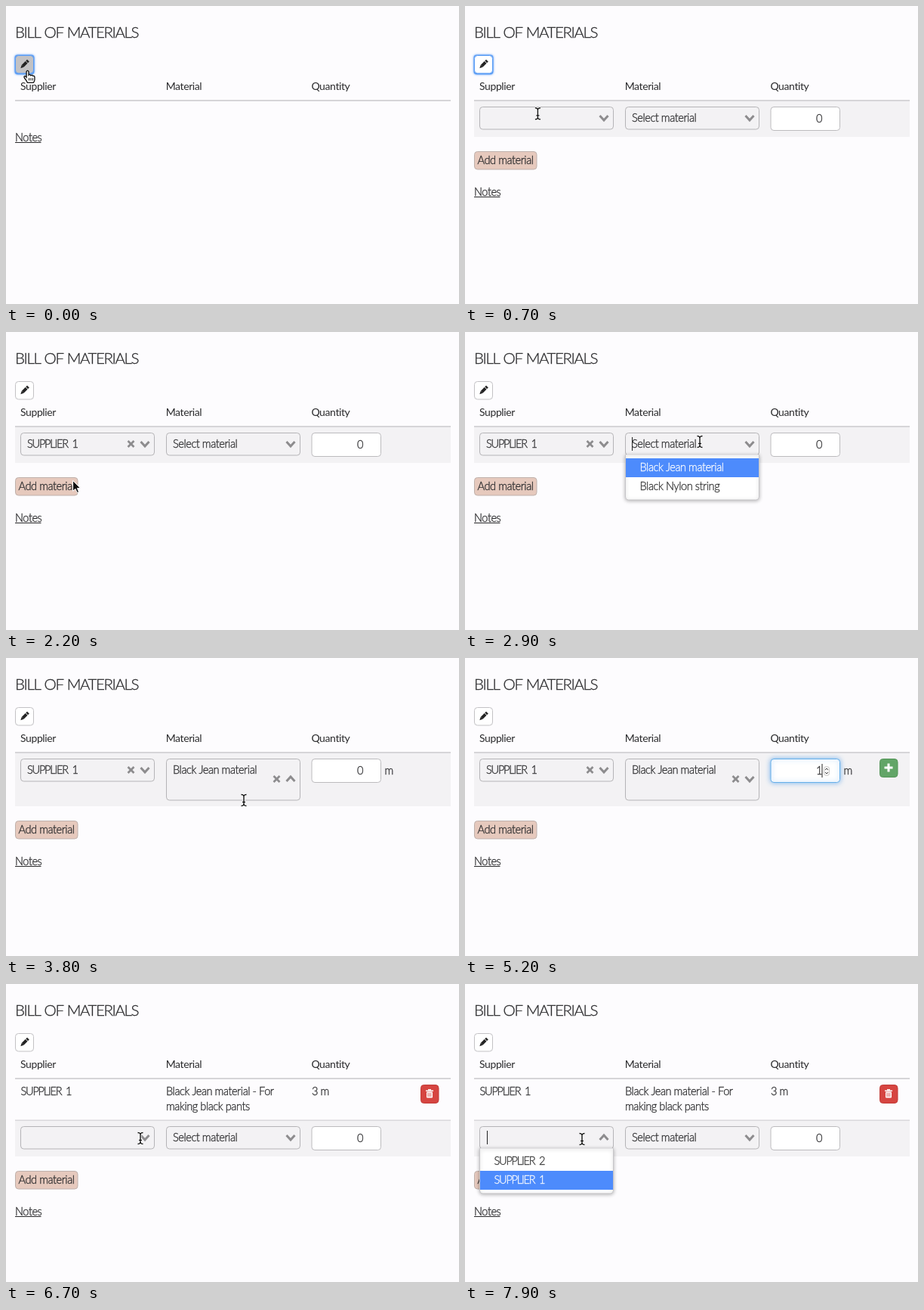
An HTML page with a canvas for the animation above (8000 ms loop, 600 px wide and 394 px high).

```html
<!DOCTYPE html>
<html lang="en">
<head>
<meta charset="utf-8">
<title>Bill of materials</title>
<style>
html, body { margin: 0; width: 100%; height: 100%; overflow: hidden; background: #fdfcfe; }
canvas { display: block; width: 600px; height: 394px; }
</style>
</head>
<body>
<canvas id="stage"></canvas>
<script>
const W = 600, H = 394, LOOP = 8000, STEP = 100;
const canvas = document.getElementById('stage');
const ctx = canvas.getContext('2d');
const dpr = window.devicePixelRatio || 1;
canvas.width = W * dpr;
canvas.height = H * dpr;

const PAGE = '#fdfcfe', ROW = '#f3f2f4', INK = '#2b2b2d', BLUE = '#4d8bfc';
const FONT = 'Lato, "Open Sans", sans-serif';
// font, letter spacing, word spacing, extra stroke
const STYLES = {
  title: ['300 20.5px ' + FONT, '-1.4px', '1px', .3],
  head: ['400 14px ' + FONT, '-0.4px', '0px', 0],
  body: ['300 14.6px ' + FONT, '-0.45px', '0px', .3],
  caps: ['300 14.6px ' + FONT, '-1.25px', '3px', .3]
};

// Moments of the interaction, in ms
const EDIT = 200, OPEN_SUP = 900, PICK_SUP = 2000, OPEN_MAT = 2900, PICK_MAT = 3800,
      FOCUS_QTY = 4700, TYPE = 5000, ADD = 6100, OPEN_NEXT = 7800;

// Pointer stops: time, x, y
const PATH = [
  [0, 31, 93], [300, 31, 93], [800, 104, 148], [1000, 104, 149], [1500, 75, 197], [1600, 75, 197],
  [1800, 74, 207], [2100, 74, 207], [2700, 311, 145], [3000, 311, 145], [3400, 315, 188],
  [3900, 315, 188], [4500, 446, 149], [5700, 446, 149], [6000, 561, 150], [6200, 561, 150],
  [6600, 178, 204], [6800, 178, 204], [7300, 155, 205], [LOOP, 155, 205]
];

const within = (t, a, b) => t >= a && t < b;
const blink = (t, start) => (t - start) % 1000 < 500;

function pointerAt(t) {
  const i = PATH.findIndex(p => p[0] > t);
  const [t0, x0, y0] = PATH[i - 1], [t1, x1, y1] = PATH[i];
  const u = (t - t0) / (t1 - t0), e = u * u * (3 - 2 * u);
  return [x0 + (x1 - x0) * e, y0 + (y1 - y0) * e];
}

function text(str, x, y, style = 'body', color = INK, align = 'left') {
  const [font, spacing, words, stroke] = STYLES[style];
  ctx.font = font;
  ctx.letterSpacing = spacing;
  ctx.wordSpacing = words;
  ctx.fillStyle = ctx.strokeStyle = color;
  ctx.textAlign = align;
  ctx.fillText(str, x, y);
  if (stroke) {
    ctx.lineWidth = stroke;
    ctx.strokeText(str, x, y);
  }
}

function rect(x, y, w, h, color) {
  ctx.fillStyle = color;
  ctx.fillRect(x, y, w, h);
}

function box(x, y, w, h, r, fill, stroke) {
  ctx.beginPath();
  ctx.roundRect(x + .5, y + .5, w - 1, h - 1, r);
  ctx.fillStyle = fill;
  ctx.fill();
  if (stroke) {
    ctx.strokeStyle = stroke;
    ctx.lineWidth = 1;
    ctx.stroke();
  }
}

function lines(points, width, color) {
  ctx.beginPath();
  points.forEach(([x, y], i) => i ? ctx.lineTo(x, y) : ctx.moveTo(x, y));
  ctx.lineWidth = width;
  ctx.strokeStyle = color;
  ctx.stroke();
}

function glow(color, blur, dy, draw) {
  ctx.save();
  ctx.shadowColor = color;
  ctx.shadowBlur = blur * dpr;
  ctx.shadowOffsetY = dy * dpr;
  draw();
  ctx.restore();
}

function chevron(x, y, up) {
  const d = up ? -3 : 3;
  lines([[x - 5.5, y - d], [x, y + d], [x + 5.5, y - d]], 3, '#8d8c8e');
}

function cross(x, y) {
  lines([[x - 4, y - 4], [x + 4, y + 4]], 2.6, '#8d8c8e');
  lines([[x - 4, y + 4], [x + 4, y - 4]], 2.6, '#8d8c8e');
}

const caret = (x, y) => rect(x, y - 9, 1, 18, '#222');

function select(x, y, label, { chosen, up, h = 30.5, style } = {}) {
  box(x, y, 178, h, 4, ROW, '#b5b4b7');
  text(label, x + 9, y + 19.5, style);
  const mid = y + (h > 31 ? 27 : 15);
  chevron(x + 165, mid, up);
  if (chosen) cross(x + 146.5, mid);
}

function menu(x, y, items, active, style) {
  glow('rgba(0,0,0,.28)', 5, 1, () => box(x, y, 178, 60.5, [0, 0, 4, 4], '#fff', '#c6c5c8'));
  rect(x + 1, y, 176, 1, '#e2e1e4');
  items.forEach((item, i) => {
    const top = y + 5 + i * 25;
    if (i === active) rect(x + 1, top, 176, 25, BLUE);
    text(item, x + 19.5, top + 17, style, i === active ? '#fff' : '#333');
  });
}

function quantity(y, value, t, focused, hover) {
  const field = border => box(404.5, y, 92.5, 32, 4, '#fff', border);
  if (focused) glow('rgba(90,165,235,.8)', 6, 0, () => field('#66afe9'));
  else field('#bcbbbe');
  text(value, 473, y + 20.5, 'body', INK, 'right');
  if (focused && blink(t, TYPE)) caret(472.5, y + 16);
  if (focused || hover) {
    box(475, y + 10, 8, 13, 3, '#f4f4f4', '#c9c9c9');
    lines([[477, y + 15], [479, y + 13], [481, y + 15]], 1, '#444');
    lines([[477, y + 18], [479, y + 20], [481, y + 18]], 1, '#444');
  }
}

function pencil(t) {
  const ring = t < OPEN_SUP, hover = t < 400;
  if (ring) glow('rgba(77,148,245,.9)', 3, 0, () => box(11, 64, 27, 27, 4, '#5b9df5'));
  box(12, 65, 25, 24.5, 4, hover ? '#c3c2c4' : '#fff', ring ? '#5b9df5' : '#c3c2c5');
  ctx.save();
  ctx.translate(25, 76.5);
  ctx.rotate(-Math.PI / 4);
  rect(-4, -2, 7, 4, '#222');
  rect(3.8, -2, 2.4, 4, '#222');
  ctx.beginPath();
  ctx.moveTo(-4, -2);
  ctx.lineTo(-8, 0);
  ctx.lineTo(-4, 2);
  ctx.fill();
  ctx.restore();
}

function plusButton() {
  box(549, 133, 24.5, 25, 4, '#62a567', '#559659');
  rect(555.5, 143.5, 11, 3, '#fff');
  rect(559.5, 139.5, 3, 11, '#fff');
}

function trashButton() {
  box(549, 133, 24.5, 25, 4, '#d64541', '#c33b38');
  rect(556, 140.5, 10, 1.5, '#fff');
  rect(559, 139, 4, 1.5, '#fff');
  box(556.5, 142, 9, 9, 1, '#fff');
  for (let i = 0; i < 3; i++) rect(558.5 + i * 2, 144, .8, 5, '#d64541');
}

function footer(dy, editing) {
  if (editing) {
    box(12, 192 + dy, 83.5, 24.5, 4, '#e6c9bd', '#bfb1ac');
    text('Add material', 16.5, 209 + dy);
  }
  const y = editing ? 251 + dy : 179;
  text('Notes', 12, y);
  rect(12, y + 1, 34.5, 1, INK);
}

function editRow(t) {
  const added = t >= ADD, dy = added ? 55 : 0;
  const tall = within(t, PICK_MAT, ADD);
  const top = 133 + dy;
  const supplied = within(t, PICK_SUP, ADD);
  const supOpen = within(t, OPEN_SUP, PICK_SUP) || t >= OPEN_NEXT;
  const matOpen = within(t, OPEN_MAT, PICK_MAT);
  const qtyFocus = within(t, FOCUS_QTY, ADD);

  rect(12, 126 + dy, 577, tall ? 70 : 47, ROW);
  footer(tall ? 23 : dy, true);
  select(19, top, supplied ? 'SUPPLIER 1' : '', { chosen: supplied, up: supOpen, style: 'caps' });
  select(212, top, tall ? 'Black Jean material' : 'Select material', {
    chosen: tall, h: tall ? 55.5 : 30.5, up: t > OPEN_MAT && t < FOCUS_QTY
  });

  const count = t < TYPE || added ? 0 : t < 5300 ? 1 : t < 5500 ? 2 : 3;
  quantity(top, String(count), t, qtyFocus, within(t, 4400, FOCUS_QTY));
  if (tall) text('m', 501.5, 154);
  if (count) plusButton();

  if (supOpen) {
    const start = added ? OPEN_NEXT : OPEN_SUP;
    if (blink(t, start)) caret(29, top + 15);
    menu(19, top + 29, ['SUPPLIER 2', 'SUPPLIER 1'], added || t >= 1700 ? 1 : 0, 'caps');
  }
  if (matOpen) {
    if (blink(t, OPEN_MAT)) caret(221, top + 15);
    menu(212, top + 29, ['Black Jean material', 'Black Nylon string'], 0);
  }
}

function savedRow() {
  text('SUPPLIER 1', 19.5, 147, 'caps');
  text('Black Jean material - For', 212, 147);
  text('making black pants', 212, 166.5);
  text('3 m', 405, 147);
  trashButton();
  rect(12, 179.5, 577, 1.5, '#d9d8db');
}

function beam(x, y) {
  const stem = [[x, y - 6.5], [x, y + 6.5]];
  const serif = s => [[x - 3.5, y + 7.5 * s], [x - 1.5, y + 7.2 * s], [x, y + 6 * s],
                      [x + 1.5, y + 7.2 * s], [x + 3.5, y + 7.5 * s]];
  for (const [w, c] of [[3, '#fff'], [1.4, '#111']]) {
    [stem, serif(1), serif(-1)].forEach(p => lines(p, w, c));
  }
  lines([[x - 2, y + 2.5], [x + 2, y + 2.5]], 1.2, '#111');
}

function hand(x, y) {
  ctx.save();
  ctx.translate(x, y);
  ctx.scale(1.12, 1.12);
  const shape = new Path2D('M-3.5 1V-5.5Q-2.2-8-.9-5.5V-1.5Q.6-3 1.7-1Q3.3-2.2 4.1-.4' +
    'Q6-1.1 6.2 1V4Q6 6 4.7 7.5H-2.3Q-3 5.5-5.8 2Q-7-.2-5.3-.4Q-4.3-.2-3.5 1Z');
  ctx.fillStyle = '#fff';
  ctx.fill(shape);
  ctx.strokeStyle = '#111';
  ctx.lineWidth = 1.2;
  ctx.stroke(shape);
  for (let i = 0; i < 3; i++) lines([[-.4 + i * 2.1, 2], [-.4 + i * 2.1, 5]], .9, '#111');
  ctx.restore();
}

function arrow(x, y) {
  const shape = new Path2D('M0 0V14L3.3 11L5.7 16L8 15L5.8 10.2H10Z');
  ctx.save();
  ctx.translate(x - 3, y - 6);
  ctx.fillStyle = '#111';
  ctx.fill(shape);
  ctx.strokeStyle = '#fff';
  ctx.lineWidth = 1;
  ctx.stroke(shape);
  ctx.restore();
}

function pointer(t) {
  if (within(t, TYPE, 5800)) return;
  const [x, y] = pointerAt(t);
  const onButton = t < 400 || within(t, 6000, 6300);
  const onOption = within(t, 1200, 2100) || within(t, 3200, PICK_MAT);
  const onField = within(t, 700, 1200) || within(t, 2600, 3200) ||
    within(t, PICK_MAT, 4000) || within(t, 4400, TYPE) || t >= 6700;
  (onButton || onOption ? hand : onField ? beam : arrow)(x, y);
}

function draw(t) {
  ctx.setTransform(dpr, 0, 0, dpr, 0, 0);
  rect(0, 0, W, H, PAGE);
  text('BILL OF MATERIALS', 12, 41.5, 'title');
  pencil(t);
  ['Supplier', 'Material', 'Quantity'].forEach((s, i) => text(s, 19 + i * 192.7, 111, 'head'));
  if (t >= ADD) savedRow();
  if (t >= EDIT) editRow(t);
  else footer(0, false);
  rect(12, 124, 577, 2, '#d6d5d8');
  pointer(t);
}

function tick(now) {
  const t = now % LOOP;
  draw(Math.floor(t / STEP) * STEP);
  requestAnimationFrame(tick);
}
requestAnimationFrame(tick);
</script>
</body>
</html>
```
